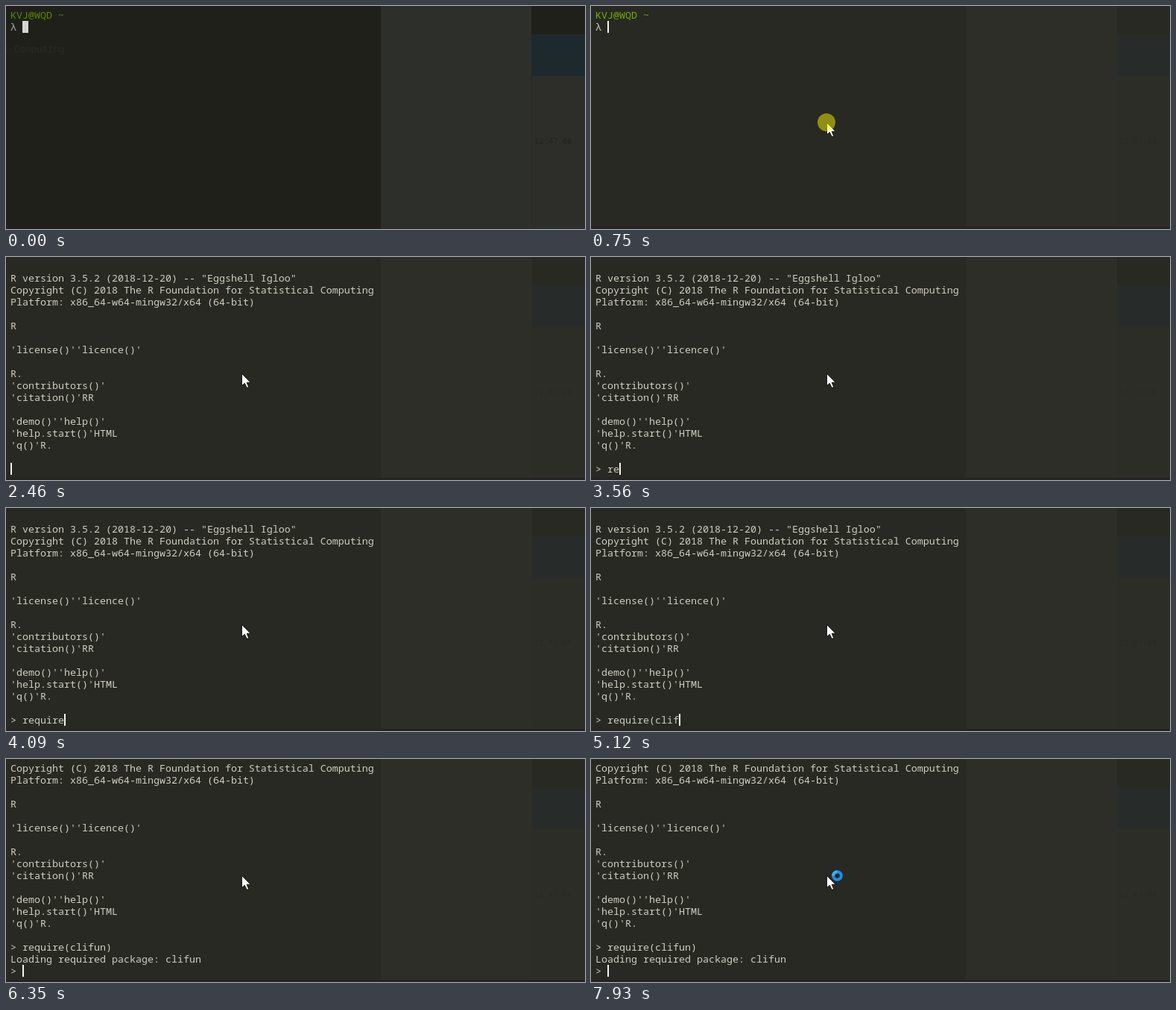
Animation of 777 by 299 pixels, one loop 8 s. Source, as an HTML page:

```html
<!DOCTYPE html>
<html lang="en">
<head>
<meta charset="utf-8">
<title>Terminal session</title>
<style>
  html, body { margin: 0; width: 100%; height: 100%; overflow: hidden; background: #282923; }
  svg { display: block; width: 777px; height: 299px; }
  text { font: 13.333px "Noto Sans Mono", "DejaVu Sans Mono", monospace; white-space: pre; }
  .title { font-size: 12.5px; }
  .clock { font-size: 10.5px; }
</style>
</head>
<body>
<svg viewBox="0 0 777 299">
  <g id="idle">
    <rect width="777" height="299" fill="#20201b"/>
    <rect x="503" width="202" height="299" fill="#2d2f2a"/>
    <rect x="705" y="38" width="72" height="56" fill="#1d292d"/>
    <rect x="705" y="94" width="72" height="205" fill="#2d2e29"/>
    <path d="M705.5 94V294M710.5 94V294" stroke="#2a2b26"/>
    <text class="title" x="-4" y="62" fill="#2a2a25">l Computing</text>
    <text class="clock" x="709" y="185" fill="#22231f">12:47:08</text>
    <rect y="295" width="503" height="4" fill="#221e1c"/>
  </g>
  <g id="active">
    <rect width="777" height="299" fill="#282923"/>
    <rect x="503" width="203" height="299" fill="#2e2e29"/>
    <rect x="706" y="38" width="71" height="56" fill="#272c2a"/>
    <rect x="706" y="94" width="71" height="205" fill="#2d2d28"/>
    <text class="clock" x="709" y="185" fill="#292a25">12:47:08</text>
    <rect y="296" width="777" height="3" fill="#272322"/>
  </g>
  <g id="rows"></g>
  <rect id="caret" height="16"/>
  <path id="arrow" d="M.5 .5V16.5L4.3 13.2L7 19H9.3V17.6L7.1 12.2H12Z" fill="#fff" stroke="#000" stroke-width=".8"/>
  <path id="beam" d="M313 149.5h3M317 149.5h3M316.5 150v14M313 164.5h3M317 164.5h3" stroke="#d7d7dc" fill="none"/>
  <circle id="click" cx="316" cy="156" r="12" fill="#f6f600" opacity=".5"/>
  <g id="busy" fill="none" stroke-width="4">
    <circle cx="330.5" cy="156.5" r="5.3" stroke="#1c8df0"/>
    <path d="M325.2 156.5a5.3 5.3 0 0 1 5.3 -5.3" stroke="#3fb0f8"/>
  </g>
</svg>
<script>
const LOOP = 8000, ROWS = 18, CELL = 8, LINE = 16;
const $ = id => document.getElementById(id);
const show = (id, on) => $(id).setAttribute('visibility', on ? 'visible' : 'hidden');
const within = (t, a, b) => t >= a && t < b;

const banner = [
  '',
  'R version 3.5.2 (2018-12-20) -- "Eggshell Igloo"',
  'Copyright (C) 2018 The R Foundation for Statistical Computing',
  'Platform: x86_64-w64-mingw32/x64 (64-bit)',
  '',
  'R',
  '',
  "'license()''licence()'",
  '',
  'R.',
  "'contributors()'",
  "'citation()'RR",
  '',
  "'demo()''help()'",
  "'help.start()'HTML",
  "'q()'R.",
  ''
];
const command = 'require(clifun)';
const keyTimes = [3390, 3560, 3710, 3880, 3950, 4020, 4090, 4320, 4640, 4720, 4800, 5120, 5190, 5420, 5740];

const rows = Array.from({ length: ROWS }, (_, i) => {
  const row = document.createElementNS('http://www.w3.org/2000/svg', 'text');
  row.setAttribute('x', 6);
  row.setAttribute('y', i * LINE + 17);
  return $('rows').appendChild(row);
});

// All terminal lines so far; the caret sits at the end of the last one.
function screenLines(t) {
  if (t < 2460) {
    const lines = ['KVJ@WQD ~', t < 1850 ? 'λ ' : 'λ R'];
    return t < 2230 ? lines : [...lines, ''];
  }
  if (t < 2920) return [...banner, ''];
  const typed = command.slice(0, keyTimes.filter(k => k <= t).length);
  const lines = [...banner, '> ' + typed];
  if (t >= 6350) lines.push('Loading required package: clifun', '> ');
  else if (t >= 6290) lines.push('');
  return lines;
}

function drawText(t, focused) {
  const lines = screenLines(t).slice(-ROWS);
  const shell = t < 2460;
  rows.forEach((row, i) => {
    const line = lines[i] || '';
    if (row.textContent !== line) row.textContent = line;
    const color = shell && i === 0 ? (focused ? '#74ad05' : '#5a8805')
      : focused ? '#d0cec0' : '#aaaa9c';
    row.setAttribute('fill', color);
  });
  const last = lines.length - 1, caret = $('caret');
  caret.setAttribute('x', 6 + lines[last].length * CELL);
  caret.setAttribute('y', 4 + last * LINE);
  caret.setAttribute('width', focused ? 2 : CELL);
  caret.setAttribute('fill', focused ? '#f4f4ee' : '#d6d6d0');
  show('caret', !within(t, 1220, 1770) && !within(t, 6910, 7460));
}

function drawPointer(t) {
  const p = Math.min(3, Math.max(0, Math.floor((t - 350) / 76.6))) / 3;
  const x = Math.round(658 - 342 * p), y = Math.round(283 - 127 * p);
  $('arrow').setAttribute('transform', `translate(${x} ${y})`);
  // Holding Shift for a bracket turns the arrow into a text beam.
  const shift = within(t, 4320, 4640) || within(t, 5740, 6290);
  show('arrow', t >= 350 && !shift);
  show('beam', shift);
  show('click', within(t, 750, 840));
  show('busy', t >= 7930);
}

function render(t) {
  const focused = t >= 750;
  show('idle', !focused);
  show('active', focused);
  drawText(t, focused);
  drawPointer(t);
}

const start = performance.now();
function tick() {
  render((performance.now() - start) % LOOP);
  requestAnimationFrame(tick);
}
render(0);
requestAnimationFrame(tick);
</script>
</body>
</html>
```
